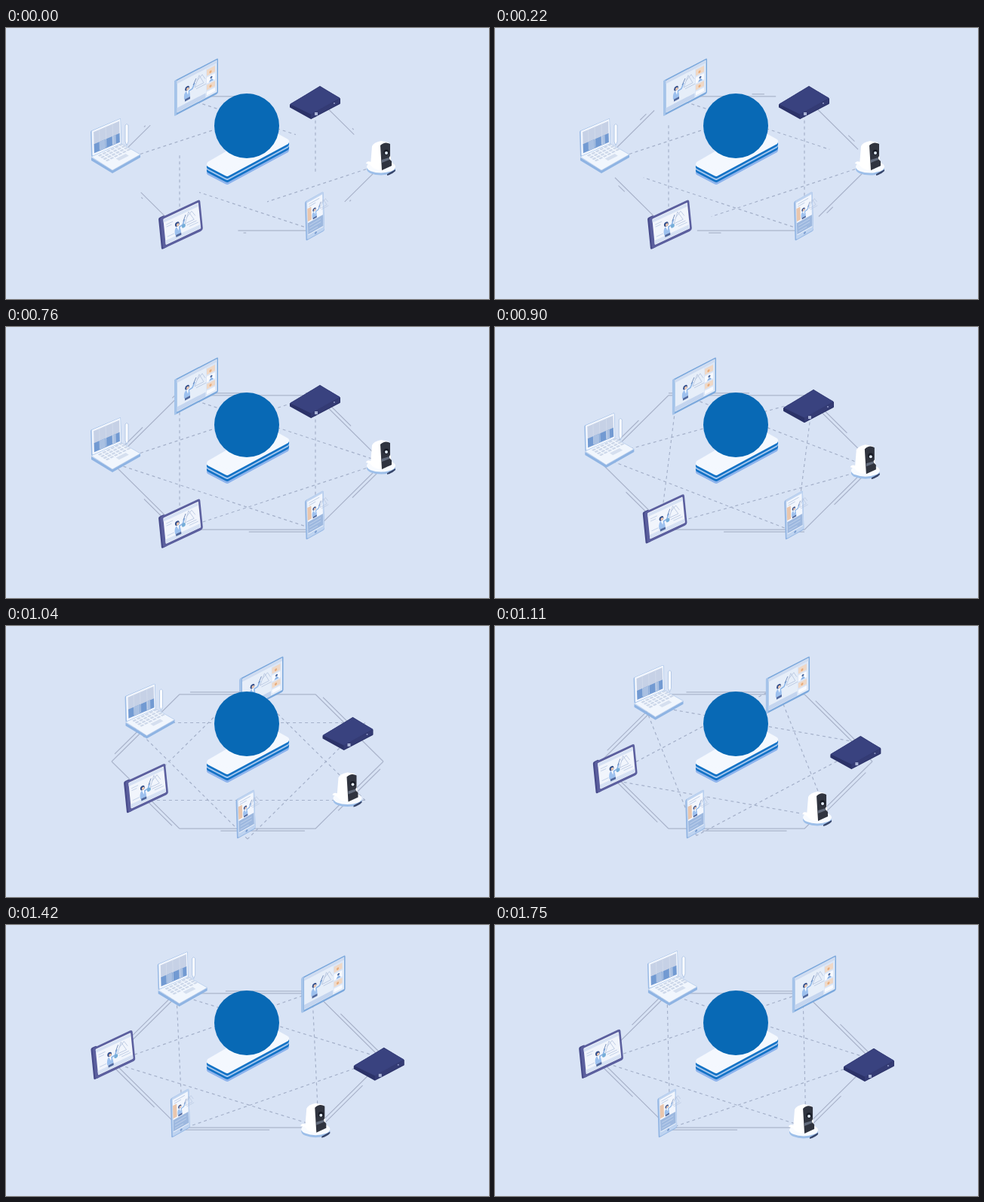
Write an HTML page that moves like this. It is 640 by 360 pixels and loops after 1880 ms.

```html
<!DOCTYPE html>
<html lang="en">
<head>
<meta charset="utf-8">
<title>Connected devices</title>
<style>
  html, body { margin: 0; width: 100%; height: 100%; overflow: hidden; background: #d8e3f5; }
  svg { display: block; width: 100vw; height: 100vh; }
  #links path { fill: none; stroke: #abb5cc; stroke-width: 1.2; }
  #links #star { stroke: #a5b1ca; stroke-dasharray: 4 4; }
</style>
</head>
<body>
<svg viewBox="0 0 640 360">
  <defs>
    <g id="teacher">
      <path d="M10 4L16-9L22 4ZM13-3L20-8L24 0M12 7H25" fill="none" stroke="#b3c2dd" stroke-width=".7"/>
      <path d="M-4 13Q-5 3 0 3Q4 3 4 13Z" fill="#9cc0ee"/>
      <path d="M-1 3L1 9L2 3Z" fill="#fff"/>
      <path d="M2 5L7 4L10-2" fill="none" stroke="#86b1e6" stroke-width="1.7"/>
      <path d="M8 0L12-7" stroke="#5c79ad" stroke-width=".7"/>
      <circle r="2.9" fill="#34508c"/>
      <circle cx=".7" cy="1" r="1.7" fill="#efc7ae"/>
      <path d="M-3 13H4V16H-3Z" fill="#50699f"/>
    </g>
    <path id="slab" d="M270 182L346 138L371 152L293 194Z" stroke-width="8" stroke-linejoin="round"/>
  </defs>

  <g id="links"><path id="rails"/><path id="star"/></g>

  <g class="device">
    <g transform="matrix(1 -.52 0 1 223 70)">
      <rect width="58" height="47" rx="2" fill="#7ba8dc"/>
      <rect width="3" height="47" rx="1" fill="#a5c4ea"/>
      <rect x="3.5" y="2" width="53" height="42.500" fill="#e6eef9"/>
      <rect x="3.5" y="2" width="53" height="4" fill="#cfdcf1"/>
      <rect x="3.5" y="38" width="38" height="6" fill="#c4d5ef"/>
      <rect x="42" y="6" width="13" height="37" fill="#dbe6f7"/>
      <path d="M43 8h11v8h-11zM43 28h11v7h-11z" fill="#efd8c6"/>
      <path d="M43 18h11v8h-11zM43 37h11v5h-11z" fill="#f8fafe"/>
      <circle cx="48" cy="13" r="1.6" fill="#e9ad7c"/>
      <circle cx="49" cy="21" r="1.5" fill="#4a689f"/>
      <path d="M46 26q3-6 6 0z" fill="#86b1e6"/>
      <circle cx="48" cy="32" r="1.6" fill="#e9ad7c"/>
      <use href="#teacher" x="17" y="19"/>
    </g>
  </g>

  <g class="device" stroke-linejoin="round">
    <path d="M377 102L416 78L442 94V100L404 120L377 105Z" fill="#2b3268" stroke="#2b3268" stroke-width="2"/>
    <path d="M404 114L442 94V100L404 120Z" fill="#343b74"/>
    <path d="M377 101L416 78L442 93L404 114Z" fill="#39427f" stroke="#39427f"/>
    <rect x="409" y="112" width="4" height="4" fill="#a9b3d6"/>
    <circle cx="435" cy="100" r="1" fill="#8f98c6"/>
  </g>

  <g class="device">
    <ellipse cx="497" cy="187.500" rx="19" ry="8" fill="#9dbfe9"/>
    <path d="M505 194L516 188V190Q512 194 505 196Z" fill="#37466b"/>
    <ellipse cx="497" cy="184.500" rx="19" ry="8" fill="#f8fbff"/>
    <path d="M477 180Q478 176 484 178V182Z" fill="#fff"/>
    <path d="M485 157Q487 152 497 150L507 152L511 183L499 189Q487 189 483 182Z" fill="#fff"/>
    <path d="M496 156Q502 150 509 154V170L507 173L511 177V183L498 189Z" fill="#30343f"/>
    <path d="M498 175L508 172V175L498 179Z" fill="#626b7c"/>
    <circle cx="504" cy="165" r="3.6" fill="#171b25"/>
    <circle cx="504" cy="166" r="2" fill="#e1ebf8"/>
  </g>

  <g class="device">
    <g transform="matrix(1 -.57 .03 1 396 231)">
      <rect width="24.500" height="52" rx="2" fill="#8fb3e2"/>
      <rect x="1.5" width="23" height="51" rx="2" fill="#bed3f0"/>
      <rect x="3" y="3" width="20" height="43" fill="#f2f6fd"/>
      <path d="M5 6h14M5 9h9" stroke="#becde5"/>
      <rect x="3" y="11" width="5" height="17" fill="#eac6ac"/>
      <use href="#teacher" transform="translate(12 17) scale(.75)"/>
      <rect x="3" y="30" width="20" height="15" fill="#9db8df"/>
      <path d="M5 34h15M5 38h15M5 42h11" stroke="#bfd1ec"/>
      <circle cx="13" cy="48.500" r="1.5" fill="#7d9fd0"/>
    </g>
  </g>

  <g class="device">
    <g transform="matrix(1 -.47 .1 1 204 252.500)">
      <rect x="-2" y="-1" width="8" height="42" rx="2" fill="#464a8a"/>
      <rect width="53" height="41" rx="3" fill="#5b5f9e"/>
      <rect x="4" y="3" width="46.500" height="34.500" rx="1" fill="#f1f5fc"/>
      <path d="M4 4h46v4H4zM4 32h46v5H4z" fill="#d7e2f4"/>
      <path d="M7 12h9M7 15h7M7 28h9M36 28h12" stroke="#c4d2e9"/>
      <use href="#teacher" x="21" y="18"/>
      <circle cx="29" cy="24" r="2.5" fill="#75add8"/>
    </g>
  </g>

  <g class="device">
    <path d="M113 172L141 189L178 168V172L141 193L113 176Z" fill="#8fb4e3"/>
    <path d="M113 171L152 153L178 168L141 189Z" fill="#f1f6fd" stroke="#b5cceb" stroke-width=".8"/>
    <g transform="matrix(1 -.5 .83 .55 121 170)">
      <path d="M1 1H33M1 5H33M1 9H33M1 13H33" stroke="#ccd7e9" stroke-width="2.6" stroke-dasharray="4 1.5"/>
      <path d="M11 19H24" stroke="#d5dfef" stroke-width="5"/>
    </g>
    <g transform="matrix(1 -.43 .03 1 112 137)">
      <rect width="40" height="34" rx="1.5" fill="#9bbbe5"/>
      <rect x="1.5" y=".5" width="38" height="33" rx="1" fill="#f2f6fd"/>
      <rect x="4" y="3" width="34" height="17" fill="#c6d1e6"/>
      <rect x="4" y="19" width="34" height="12" fill="#729ad2"/>
      <path d="M12 19h7v12h-7zM28 19h5v12h-5z" fill="#a9c0e2"/>
      <path d="M11.500 3V30M20 3V30M29 3V30" stroke="#d5deed" stroke-width=".6"/>
    </g>
    <path d="M158 129Q160 126 162 129V151L160 156L158 151Z" fill="#fafcff" stroke="#a9c1e3" stroke-width=".8"/>
  </g>

  <g>
    <use href="#slab" y="10" fill="#8db3ec" stroke="#8db3ec"/>
    <use href="#slab" y="7" fill="#1473c6" stroke="#1473c6"/>
    <use href="#slab" y="4" fill="#a9caf1" stroke="#a9caf1"/>
    <use href="#slab" y="2" fill="#1473c6" stroke="#1473c6"/>
    <use href="#slab" y="-1" fill="#f4f8fe" stroke="#f4f8fe"/>
    <circle cx="319" cy="130" r="43" fill="#0869b5"/>
  </g>
</svg>
<script>
const holds = [110, 110, 100, 100, 90, 90, 80, 80, 70, 70, 70, 70, 70, 70, 70, 80, 90, 100, 110, 120, 130];
const loop = holds.reduce((sum, ms) => sum + ms);
const turnStart = 8, turnMiddle = 12;
// Shift of each device to its neighbour's place: board, box, camera, phone, tablet, laptop
const shifts = [[173, 0], [87, 88], [-89, 89], [-183, 0], [-92, -91], [91, -87]];
const devices = document.querySelectorAll('.device');
const rails = document.getElementById('rails');
const star = document.getElementById('star');
const clamp = v => Math.min(1, Math.max(0, v));

function corner(k, turn = 0) {
  const a = (240 + 60 * (k + turn)) * Math.PI / 180;
  return [320 + 180 * Math.cos(a), 180 + 103 * Math.sin(a)];
}

// Part of the line a-b between the fractions from and to
function part(a, b, from, to, [ox, oy] = [0, 0]) {
  from = clamp(from);
  to = clamp(to);
  if (to <= from) return '';
  const at = t => `${a[0] + (b[0] - a[0]) * t + ox} ${a[1] + (b[1] - a[1]) * t + oy}`;
  return `M${at(from)}L${at(to)}`;
}

function stepAt(ms) {
  let step = 0;
  while (ms >= holds[step]) ms -= holds[step++];
  return step;
}

// A quick S-curve that ends in a slow, even drift
function travelAt(step) {
  if (step <= turnStart) return 0;
  const swing = 1 / (1 + Math.exp(1.3 * (turnMiddle - step)));
  return Math.min(swing, 1 - .0046 * (22.6 - step));
}

function draw(step) {
  const drawn = clamp(.57 + .11 * step);
  const travel = travelAt(step);
  const head = .49 + (step - turnStart) * (step < turnStart ? .2 : .052);
  let solid = '', dashed = '';
  for (let k = 0; k < 6; k++) {
    const a = corner(k), b = corner(k + 1);
    const dx = b[0] - a[0], dy = b[1] - a[1];
    const out = [3 * Math.sign(Math.round(dy)), -3 * Math.sign(Math.round(dx))];
    solid += part(a, b, 0, drawn)
      + part(a, b, .51 + .052 * step, .53 + .0875 * step, out)
      + part(a, b, head - .62, head, out);
    dashed += part(corner(k, travel), corner(k + 2, travel), 0, drawn);
    const [x, y] = shifts[k];
    devices[k].setAttribute('transform', `translate(${x * travel} ${y * travel})`);
  }
  rails.setAttribute('d', solid);
  star.setAttribute('d', dashed);
}

function tick() {
  draw(stepAt(performance.now() % loop));
  requestAnimationFrame(tick);
}
tick();
</script>
</body>
</html>
```
